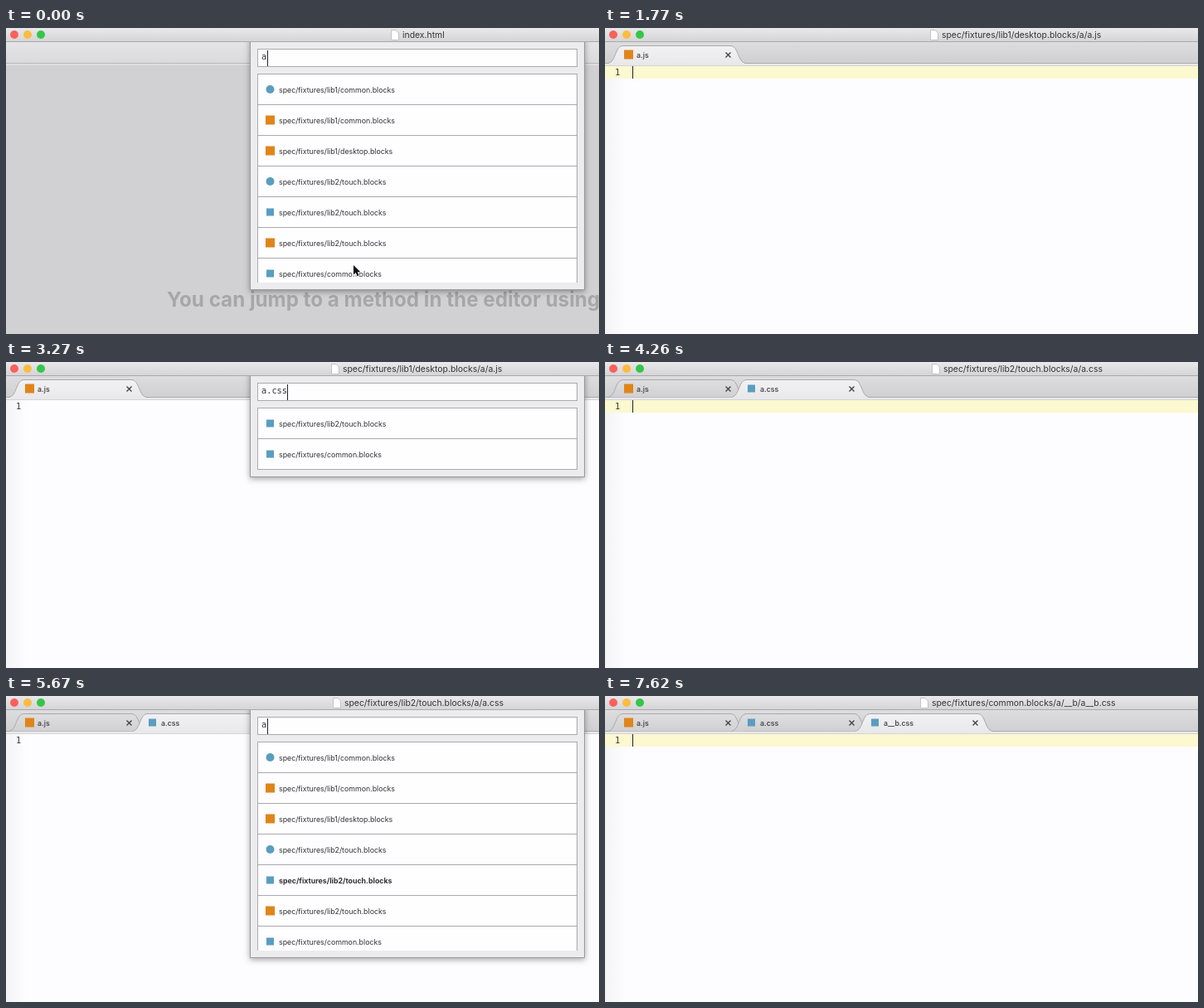
Write an HTML page with a canvas that moves like this. It is 715 by 369 pixels and loops after 7650 ms.

```html
<!DOCTYPE html>
<html lang="en">
<head>
<meta charset="utf-8">
<title>File finder</title>
<style>
html, body { margin: 0; width: 100%; height: 100%; overflow: hidden; background: #fdfcfe; }
canvas { display: block; }
</style>
</head>
<body>
<canvas id="stage" width="715" height="369"></canvas>
<script>
const LOOP = 7650;
const W = 715, H = 369;
const ctx = document.getElementById('stage').getContext('2d');
const SANS = 'Inter, Roboto, sans-serif';
const MONO = '10.3px "DejaVu Sans Mono", monospace';

const row = (kind, dir) => ({ kind, dir });
const LISTS = {
  all: [
    row('tpl', 'lib1/common'), row('js', 'lib1/common'), row('js', 'lib1/desktop'),
    row('tpl', 'lib2/touch'), row('css', 'lib2/touch'), row('js', 'lib2/touch'),
    row('css', 'common')
  ],
  js: ['lib1/common', 'lib1/desktop', 'lib2/touch', 'common'].map(d => row('js', d)),
  css: ['lib2/touch', 'common'].map(d => row('css', d)),
  elem: ['lib1/desktop', 'common'].map(d => row('css', d))
};
const TABS = [
  { name: 'a.js', kind: 'js' },
  { name: 'a.css', kind: 'css' },
  { name: 'a__b.css', kind: 'css' }
];
const TITLES = [
  { x: 478, text: 'index.html' },
  { x: 406, text: 'spec/fixtures/lib1/desktop.blocks/a/a.js' },
  { x: 408, text: 'spec/fixtures/lib2/touch.blocks/a/a.css' },
  { x: 394, text: 'spec/fixtures/common.blocks/a/__b/a__b.css' }
];

// Each step overrides part of the state from its time on.
const STEPS = [
  [0, { title: 0, tabs: 0, popup: true, query: 'a', list: 'all', selected: -1, open: '', mouse: true }],
  [390, { selected: 0, mouse: false }],
  [630, { selected: 1 }],
  [840, { selected: 2 }],
  [1200, { title: 1 }],
  [1260, { tabs: 1, popup: false, selected: -1, open: 'js lib1/desktop' }],
  [1800, { popup: true }],
  [2010, { query: 'a.' }],
  [2160, { query: 'a.j' }],
  [2250, { query: 'a.js', list: 'js' }],
  [2640, { query: 'a.j' }],
  [2760, { query: 'a.' }],
  [2940, { query: 'a.c' }],
  [3060, { query: 'a.cs' }],
  [3180, { query: 'a.css' }],
  [3210, { list: 'css' }],
  [3690, { selected: 0 }],
  [3990, { title: 2 }],
  [4050, { tabs: 2, popup: false, selected: -1, open: 'css lib2/touch' }],
  [4800, { popup: true }],
  [5340, { query: 'a.cs' }],
  [5430, { query: 'a.c' }],
  [5520, { query: 'a.' }],
  [5610, { query: 'a', list: 'all' }],
  [5970, { query: 'a_' }],
  [6150, { query: 'a__' }],
  [6330, { query: 'a__b' }],
  [6390, { list: 'elem' }],
  [6690, { selected: 0 }],
  [6900, { selected: 1 }],
  [7110, { title: 3 }],
  [7170, { tabs: 3, popup: false, selected: -1 }]
];

function stateAt(time) {
  return Object.assign({}, ...STEPS.filter(s => s[0] <= time).map(s => s[1]));
}

function rect(x, y, w, h, color) {
  ctx.fillStyle = color;
  ctx.fillRect(x, y, w, h);
}

function box(x, y, w, h, fill, stroke) {
  rect(x, y, w, h, fill);
  ctx.strokeStyle = stroke;
  ctx.lineWidth = 1;
  ctx.strokeRect(x + 0.5, y + 0.5, w - 1, h - 1);
}

function circle(x, y, r, color) {
  ctx.fillStyle = color;
  ctx.beginPath();
  ctx.arc(x, y, r, 0, Math.PI * 2);
  ctx.fill();
}

function text(str, x, y, font, color) {
  ctx.font = font;
  ctx.fillStyle = color;
  ctx.fillText(str, x, y);
}

function gradient(x0, y0, x1, y1, from, to) {
  const g = ctx.createLinearGradient(x0, y0, x1, y1);
  g.addColorStop(0, from);
  g.addColorStop(1, to);
  return g;
}

function fileIcon(kind, x, y) {
  if (kind === 'js') rect(x - 5.5, y - 5.5, 11, 11, '#df8519');
  else if (kind === 'css') rect(x - 4.5, y - 4.5, 9, 9, '#5a9dc0');
  else circle(x, y, 5, '#5a9dc0');
}

function drawTitleBar(title) {
  rect(0, 0, W, 16, gradient(0, 0, 0, 16, '#e9e8ea', '#d5d4d6'));
  rect(0, 16, W, 1, '#a9a8aa');
  ['#fc605b', '#fdbb40', '#34c649'].forEach((c, i) => circle(10 + 16 * i, 8, 5, c));
  const { x, text: label } = TITLES[title];
  const left = x - 14;
  ctx.beginPath();
  ctx.moveTo(left + 0.5, 2.5);
  ctx.lineTo(left + 6, 2.5);
  ctx.lineTo(left + 9.5, 6);
  ctx.lineTo(left + 9.5, 14.5);
  ctx.lineTo(left + 0.5, 14.5);
  ctx.closePath();
  ctx.fillStyle = '#ffffff';
  ctx.fill();
  ctx.strokeStyle = '#c2c1c3';
  ctx.lineWidth = 1;
  ctx.stroke();
  text(label, x, 12, `10.4px ${SANS}`, '#343335');
}

function drawTab(index, active) {
  const x = 149 * index;
  const { name, kind } = TABS[index];
  ctx.beginPath();
  ctx.moveTo(x + 4, 42.5);
  ctx.bezierCurveTo(x + 13, 41, x + 12, 22, x + 21, 21.5);
  ctx.lineTo(x + 152, 21.5);
  ctx.bezierCurveTo(x + 161, 22, x + 160, 41, x + 169, 42.5);
  ctx.fillStyle = active
    ? gradient(0, 21, 0, 43, '#f2f1f3', '#e9e8ea')
    : gradient(0, 21, 0, 43, '#dfdee0', '#d0cfd1');
  ctx.fill();
  ctx.strokeStyle = '#aaa9ab';
  ctx.lineWidth = 1;
  ctx.stroke();
  if (active) rect(x + 5, 42, 163, 1, '#e9e8ea');

  fileIcon(kind, x + (index ? 27.5 : 28.5), 32);
  text(name, x + 38, 36, `500 8.8px ${SANS}`, '#39383a');
  const cx = x + 148.5, cy = 32.5;
  ctx.beginPath();
  ctx.moveTo(cx - 3, cy - 3);
  ctx.lineTo(cx + 3, cy + 3);
  ctx.moveTo(cx + 3, cy - 3);
  ctx.lineTo(cx - 3, cy + 3);
  ctx.strokeStyle = '#444345';
  ctx.lineWidth = 1.4;
  ctx.stroke();
}

function drawEmptyPane() {
  rect(0, 43, W, H - 43, '#d1d0d2');
  rect(0, 17, W, 25, gradient(0, 17, 0, 42, '#e5e4e6', '#dad9db'));
  rect(0, 42, W, 1, '#b9b8ba');
  rect(0, 43, W, 2, '#dddcde');
  text('You can jump to a method in the editor using', 194, 336, `700 24.2px ${SANS}`, '#a7a6a8');
}

function drawEditor(tabs, focused) {
  rect(0, 45, W, H - 45, '#fdfcfe');
  rect(0, 45, 25, H - 45, gradient(0, 0, 25, 0, '#f4f3f5', '#fdfcfe'));
  rect(0, 17, W, 25, gradient(0, 17, 0, 42, '#dddcde', '#d0cfd1'));
  rect(0, 42, W, 1, '#aaa9ab');
  rect(0, 43, W, 2, '#e9e8ea');
  rect(0, 45, W, 1, '#d5d4d6');
  for (let i = 0; i < tabs; i++) drawTab(i, i === tabs - 1);
  if (focused) {
    rect(0, 46, W, 15, '#fcf8d0');
    rect(33, 46, 1, 15, '#222123');
  }
  text('1', 12, 57, MONO, '#39383a');
}

function drawRow(item, y, selected, open) {
  if (selected) rect(304, y + 1, 384, 36, '#e5e4e6');
  const weight = item.kind + ' ' + item.dir === open ? 700 : 400;
  fileIcon(item.kind, 318.5, y + 19);
  text(`spec/fixtures/${item.dir}.blocks`, 329, y + 22.5, `${weight} 8.8px ${SANS}`, '#323133');
  rect(303, y + 37, 386, 1, '#aaa9ab');
}

function drawPopup({ query, list, selected, open }) {
  const rows = LISTS[list];
  const listHeight = Math.min(37 * rows.length + 1, 252);
  const height = listHeight + 47;

  ctx.save();
  ctx.beginPath();
  ctx.rect(0, 17, W, H);
  ctx.clip();
  ctx.save();
  ctx.shadowColor = 'rgba(0,0,0,0.35)';
  ctx.shadowBlur = 7;
  ctx.shadowOffsetY = 2;
  rect(294, 10, 404, height + 7, '#ecebed');
  ctx.restore();
  box(294, 10, 404, height + 7, '#ecebed', '#9b9a9c');

  box(303, 25, 386, 22, '#fefdff', '#aaa9ab');
  text(query, 308, 38, MONO, '#323133');
  rect(Math.round(308.3 + 6.2 * query.length), 27, 1, 19, '#222123');

  ctx.beginPath();
  ctx.rect(303, 55, 386, listHeight);
  ctx.clip();
  box(303, 55, 386, 37 * rows.length + 1, '#fefdff', '#aaa9ab');
  rows.forEach((item, i) => drawRow(item, 55 + 37 * i, i === selected, open));
  ctx.restore();
}

function drawPointer(x, y) {
  const outline = [[0, 0], [0, 11.5], [2.7, 9], [4.6, 13.2], [6.6, 12.3], [4.8, 8.3], [8.3, 8.2]];
  ctx.beginPath();
  outline.forEach(([dx, dy]) => ctx.lineTo(x + dx, y + dy));
  ctx.closePath();
  ctx.strokeStyle = '#ffffff';
  ctx.lineWidth = 1.8;
  ctx.stroke();
  ctx.fillStyle = '#111012';
  ctx.fill();
}

function draw(now) {
  const state = stateAt(now % LOOP);
  if (state.tabs) drawEditor(state.tabs, !state.popup);
  else drawEmptyPane();
  drawTitleBar(state.title);
  if (state.popup) drawPopup(state);
  if (state.mouse) drawPointer(419, 286);
  requestAnimationFrame(draw);
}
requestAnimationFrame(draw);
</script>
</body>
</html>
```
